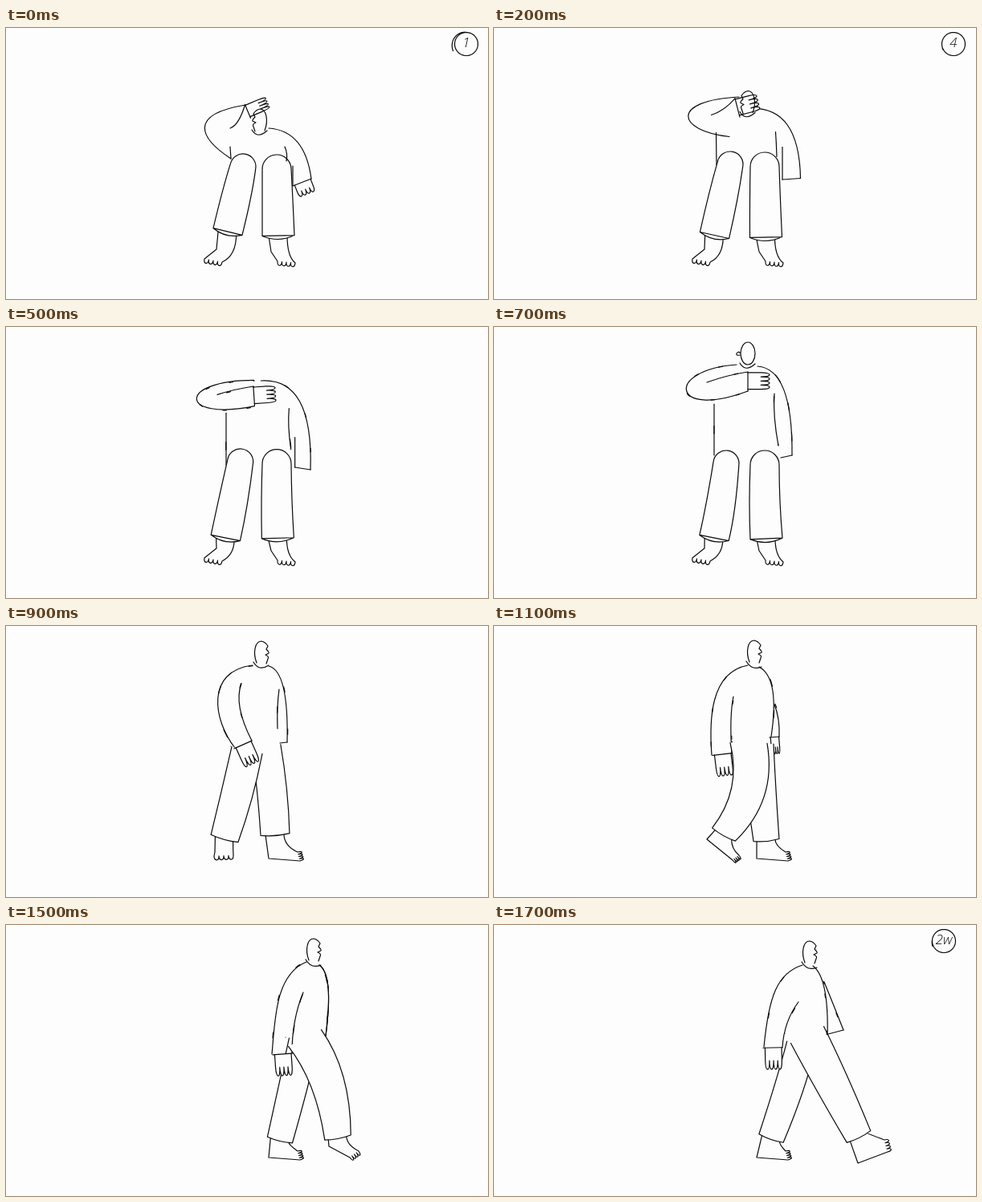
An HTML page with a canvas for the animation above (1.8 s loop, 600x338 px).

```html
<!DOCTYPE html>
<html lang="en">
<head>
<meta charset="utf-8">
<title>Standing up and walking off</title>
<style>
  html, body { margin: 0; height: 100%; overflow: hidden; background: #fefdfe; }
  canvas { display: block; }
</style>
</head>
<body>
<canvas id="stage" width="600" height="338"></canvas>
<script>
const PAPER = '#fefdfe', INK = '#0a0a0a', STEP = 100, STEPS = 18;
const ctx = document.getElementById('stage').getContext('2d');

// A foot is its heel and both ends of the row of toes.
const frontNear = [[262, 276], [247, 288], [269, 292]];
const frontFar = [[330, 279], [338, 291], [360, 293]];
const planted = [[327, 290], [366, 293], [363, 282]];

// Curves are Bezier control points; legs are hip (or raised knee), knee, hem.
const poses = [
  { step: 0, head: [316, 115], facing: 1, headless: 0,
    sleeve: [[298, 96], [225, 108], [242, 138], [280, 163]], inner: [[279, 125], [290, 121]],
    wrist: [301, 104], aim: -0.4,
    farSleeve: [[327, 125], [372, 128], [380, 188]], farCuff: [357, 197], farInner: 25, farHand: 16,
    back: [[279, 148], [280, 163]], side: [[347, 148], [351, 157], [349, 166]],
    near: [[295, 173], [287, 208], [276, 254]], far: [[337, 176], [338, 215], [339, 259]],
    nearFoot: frontNear, farFoot: frontFar },
  { step: 4, head: [316, 70], facing: 0, headless: 1,
    sleeve: [[312, 76], [211, 73], [213, 119], [306, 108]], inner: [[262, 92], [283, 86]],
    wrist: [305, 95], aim: -0.1,
    farSleeve: [[312, 76], [388, 68], [383, 187]], farCuff: [361, 181], farInner: 56, farHand: 0,
    back: [[274, 113], [274, 178]], side: [[354, 111], [352, 130], [355, 155]],
    near: [[293, 167], [283, 215], [273, 263]], far: [[337, 170], [337, 215], [338, 263]],
    nearFoot: frontNear, farFoot: frontFar },
  { step: 7, head: [316, 33], facing: 0, headless: 0,
    sleeve: [[302, 47], [213, 53], [220, 116], [316, 80]], inner: [[265, 69], [290, 60]],
    wrist: [316, 68], aim: 0,
    farSleeve: [[328, 49], [372, 52], [371, 160]], farCuff: [357, 163], farInner: 0, farHand: 0,
    back: [[274, 96], [274, 160]], side: [[349, 83], [347, 110], [354, 148]],
    near: [[289, 170], [282, 222], [274, 263]], far: [[337, 172], [337, 218], [339, 264]],
    nearFoot: frontNear, farFoot: frontFar },
  { step: 9, head: [318, 33], facing: -1, headless: 0,
    sleeve: [[307, 49], [248, 56], [258, 118], [285, 152]], inner: [[293, 72], [283, 98]],
    wrist: [295, 148], aim: 1.15,
    farSleeve: [[327, 50], [352, 56], [350, 145]], farCuff: [341, 146], farInner: 0, farHand: 0,
    back: [[280, 150], [280, 150]], side: [[340, 79], [337, 100], [338, 128]],
    near: [[300, 155], [287, 211], [272, 265]], far: [[324, 150], [331, 205], [335, 260]],
    nearFoot: [[260, 282], [259, 287], [283, 286]], farFoot: planted },
  { step: 11, head: [324, 32], facing: -1, headless: 0,
    sleeve: [[316, 49], [268, 58], [268, 120], [271, 161]], inner: [[298, 88], [293, 112]],
    wrist: [284, 160], aim: 1.45,
    farSleeve: [[349, 98], [356, 115], [355, 138]], farCuff: [343, 139], farInner: 0, farHand: 21,
    back: [[296, 145], [296, 145]], side: [[330, 51], [356, 65], [345, 138]],
    near: [[317, 146], [316, 207], [286, 260]], far: [[330, 148], [333, 205], [339, 267]],
    nearFoot: [[265, 266], [297, 292], [305, 286]], farFoot: planted },
  { step: 15, head: [383, 31], facing: -1, headless: 0,
    sleeve: [[374, 46], [335, 62], [335, 118], [331, 161]], inner: [[370, 84], [356, 118]],
    wrist: [344, 161], aim: 1.5,
    farSleeve: [[390, 50], [408, 62], [398, 138]], farCuff: [398, 138], farInner: 0, farHand: 0,
    back: [[348, 140], [348, 140]], side: [[390, 50], [408, 62], [398, 138]],
    near: [[372, 141], [400, 196], [413, 265]], far: [[370, 145], [360, 190], [341, 268]],
    nearFoot: [[402, 276], [428, 290], [439, 282]], farFoot: planted },
  { step: 17, head: [393, 34], facing: -1, headless: 0,
    sleeve: [[384, 50], [352, 60], [342, 90], [336, 152]], inner: [[379, 96], [361, 120]],
    wrist: [347, 153], aim: 1.55,
    farSleeve: [[411, 71], [422, 98], [435, 131]], farCuff: [416, 136], farInner: 0, farHand: 0,
    back: [[362, 135], [362, 135]], side: [[397, 51], [417, 66], [415, 139]],
    near: [[390, 137], [420, 196], [454, 264]], far: [[382, 150], [367, 203], [345, 266]],
    nearFoot: [[453, 297], [490, 283], [486, 268]], farFoot: planted }
];

// Step: label, centre x, turns of the pen.
const badges = {
  0: ['1', 573, 1.35], 1: ['3', 572, 1.05], 2: ['4', 572, 1.05], 3: ['5', 572, 1.05],
  4: ['6', 572, 1.05], 16: ['19', 574, 1.05], 17: ['2w', 560, 1.1]
};

const mix = (a, b, u) => Array.isArray(a) ? a.map((v, i) => mix(v, b[i], u)) : a + (b - a) * u;
const shift = (p, d, k = 1) => [p[0] + d[0] * k, p[1] + d[1] * k];

// Unit normal of a to b, turned towards the right of a downward line.
function normal(a, b) {
  const dx = b[0] - a[0], dy = b[1] - a[1], length = Math.hypot(dx, dy) || 1;
  return [dy / length, -dx / length];
}

const bezier = pts => `M${pts[0]}${pts.length === 4 ? 'C' : pts.length === 3 ? 'Q' : 'L'}${pts.slice(1).join(' ')}`;

// Quadratic continuing from a, passing through m halfway to b.
const through = (a, m, b) => `Q${shift(shift(m, m), mix(a, b, 0.5), -1)} ${b}`;

function draw(d, filled) {
  const path = new Path2D(d);
  if (filled) ctx.fill(path);
  ctx.stroke(path);
}

// Row of four rounded fingers or toes from a to b.
function digits(a, b, length) {
  const out = shift([0, 0], normal(a, b), -length / 0.75);
  return [0, 1, 2, 3].map(i => {
    const p = mix(a, b, i / 4), q = mix(a, b, (i + 1) / 4);
    return `C${shift(p, out)} ${shift(q, out)} ${q}`;
  }).join('');
}

function drawHand(a, b, length) {
  const out = normal(a, b), from = mix(a, b, 0.1), to = mix(a, b, 0.96);
  const knuckle = p => shift(p, out, -length * 0.6);
  draw(`M${from}L${knuckle(from)}${digits(knuckle(from), knuckle(to), length * 0.4)}L${to}`, true);
}

function drawLeg([hip, knee, hem], widths, foot, seated) {
  const across = [normal(hip, knee), normal(hip, hem), normal(knee, hem)];
  const edge = side => [hip, knee, hem].map((p, i) => shift(p, across[i], side * widths[i]));
  const left = edge(-1), right = edge(1);

  const [heel, toeA, toeB] = foot;
  const ankleA = shift(hem, across[2], -12), ankleB = shift(hem, across[2], 11);
  draw(`M${ankleA}L${heel}L${toeA}${digits(toeA, toeB, 5)}Q${ankleB[0]} ${toeB[1] - 8} ${ankleB}`, true);

  const top = seated ? `A${widths[0]} ${widths[0]} 0 0 1 ` : 'M';
  const sag = shift(hem, [-across[2][1], across[2][0]], seated ? 9 : 3);
  // The fill needs one outline, the ink leaves the hip open when walking.
  const leftEdge = `M${left[2]}${through(left[2], left[1], left[0])}`;
  const rightEdge = `${right[0]}${through(right[0], right[1], right[2])}Q${sag} ${left[2]}`;
  ctx.fill(new Path2D(`${leftEdge}L${rightEdge}`));
  draw(leftEdge + top + rightEdge + (seated ? `L${right[2]}` : ''));
}

function drawHead([x, y], facing, walk) {
  const side = Math.round(facing);
  const px = (dx, dy) => `${x - dx * (side || 1)} ${y + dy}`;
  draw(side
    ? `M${px(-6, 13)}C${px(-11, 0)} ${px(-8, -14)} ${px(0, -14)}Q${px(5, -13)} ${px(8, -8)}`
      + `L${px(6, -4)}Q${px(10, 0)} ${px(9, 1)}L${px(5, 3)}Q${px(10, 5)} ${px(8, 8)}L${px(6, 14)}`
    : `M${x - 9} ${y}a9 14 0 1 1 18 0a9 14 0 1 1-18 0m-1 2q-5 1-4-2q2-3 4-1`);
  draw(`M${x - 10} ${y + 12}Q${x - 3} ${y + 24} ${x + 9} ${y + 13 + 6 * walk}`);
}

function drawBadge([label, x, turns]) {
  const y = 20;
  ctx.beginPath();
  for (let t = 0; t <= turns; t += 0.02) {
    const angle = 2.6 + (turns - t) * 2 * Math.PI, r = 14.5 + Math.max(0, t - 1) * 12;
    ctx.lineTo(x + r * Math.cos(angle), y + r * Math.sin(angle));
  }
  ctx.stroke();
  ctx.fillStyle = INK;
  ctx.fillText(label, x, y);
  ctx.fillStyle = PAPER;
}

// Short overdrawn pencil accents at seeded places along the strokes.
function roughen(strokes, step) {
  const random = n => Math.abs(Math.sin(n * 12.9898 + step * 78.233) * 43758.5453) % 1;
  ctx.save();
  strokes.forEach((d, i) => {
    ctx.setLineDash([4 + 7 * random(i), 25 + 30 * random(i + 9)]);
    ctx.lineDashOffset = 60 * random(i + 20);
    ctx.setTransform(1, 0, 0, 1, random(i + 30) * 2 - 1, random(i + 40) * 2 - 1);
    ctx.stroke(new Path2D(d));
  });
  ctx.restore();
}

function poseAt(step) {
  const i = Math.min(poses.findLastIndex(p => p.step <= step), poses.length - 2);
  const a = poses[i], b = poses[i + 1], u = (step - a.step) / (b.step - a.step);
  return Object.fromEntries(Object.keys(a).map(key => [key, mix(a[key], b[key], u)]));
}

function render(step) {
  const p = poseAt(step), walk = Math.min(1, Math.max(0, (step - 7) / 4)), seated = walk === 0;
  Object.assign(ctx, {
    fillStyle: PAPER, strokeStyle: INK, lineWidth: 1.2, lineCap: 'round', lineJoin: 'round',
    font: 'italic 300 17px "Open Sans", sans-serif', textAlign: 'center', textBaseline: 'middle'
  });
  ctx.fillRect(0, 0, 600, 338);
  if (badges[step]) drawBadge(badges[step]);

  const farEnd = p.farSleeve[2];
  if (p.farHand > 14) drawHand(p.farCuff, farEnd, p.farHand);
  if (p.farInner > 1) draw(bezier([p.farCuff, shift(p.farCuff, [0, -p.farInner])]));
  draw(bezier([p.farCuff, farEnd]));
  drawLeg(p.far, [18, 19 - walk, 20 - 4 * walk], p.farFoot, seated);

  const reach = [Math.cos(p.aim), Math.sin(p.aim)];
  const half = p.step < 1 ? 9 : 12;
  const cuffA = shift(p.wrist, [-reach[1], reach[0]], half);
  const cuffB = shift(p.wrist, [reach[1], -reach[0]], half);
  const strokes = [p.sleeve, [...p.inner, cuffB], p.farSleeve, p.side, p.back].map(bezier);
  strokes.forEach(d => draw(d));

  drawLeg(p.near, [16 + 7 * walk, 18 + 3 * walk, 18.5 - 2 * walk], p.nearFoot, seated);
  drawHand(cuffA, cuffB, 27);
  draw(bezier([cuffA, cuffB]));
  if (p.headless <= 0.5) drawHead(p.head, p.facing, walk);
  if (step >= 4) roughen(strokes, step);
}

let shown = -1;
function tick() {
  const step = Math.floor(performance.now() / STEP) % STEPS;
  if (step !== shown) render(shown = step);
  requestAnimationFrame(tick);
}
tick();
</script>
</body>
</html>
```
